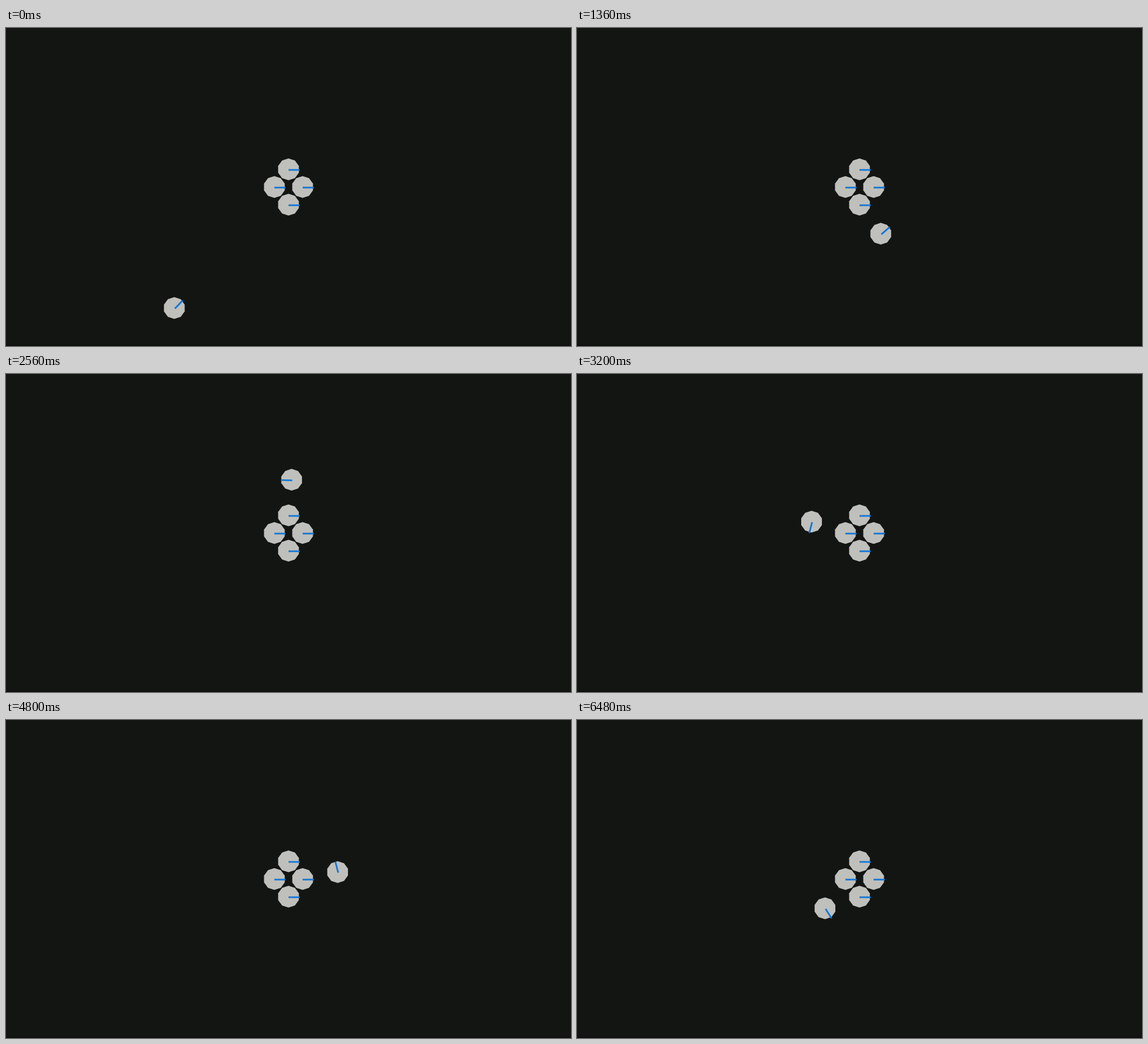
Animation of 960 by 540 pixels, one loop 6560 ms. Source, as an HTML page with a canvas:

```html
<!DOCTYPE html>
<html lang="en">
<head>
<meta charset="utf-8">
<title>Robot circling obstacles</title>
<style>
  html, body { margin: 0; height: 100%; overflow: hidden; background: #121512; }
  canvas { display: block; }
</style>
</head>
<body>
<canvas id="stage" width="960" height="540"></canvas>
<script>
const ctx = document.getElementById('stage').getContext('2d');
const STEP = 80, STEPS = 82, SUBSTEPS = 20;
const RADIUS = 18.5, SIDES = 10;

const center = { x: 480, y: 270 };
const obstacles = [[0, -30], [-24, 0], [24, 0], [0, 30]]
  .map(([dx, dy]) => ({ x: center.x + dx, y: center.y + dy }));

const FOLLOW_RANGE = 160; // start following the obstacles within this distance
const CLEARANCE = 60.5;   // distance kept while circling
const SOFTNESS = 22;      // how gently the robot closes in on that distance
const CRUISE = 15, APPROACH = 1.4; // pixels per step, and the extra when closing in

const distance = (a, b) => Math.hypot(a.x - b.x, a.y - b.y);
const bearing = (from, to) => Math.atan2(to.y - from.y, to.x - from.x);

// Head for the centre while far away, then circle the nearest obstacle counterclockwise.
function advance(robot) {
  const nearest = obstacles.reduce((a, b) => distance(robot, b) < distance(robot, a) ? b : a);
  const gap = distance(robot, nearest);
  let inward = Math.PI / 2, heading = bearing(robot, center);
  if (gap < FOLLOW_RANGE) {
    inward = Math.atan((gap - CLEARANCE) / SOFTNESS);
    heading = bearing(robot, nearest) + Math.PI / 2 - inward;
  }
  const length = (CRUISE + APPROACH * Math.sin(inward)) / SUBSTEPS;
  return { x: robot.x + length * Math.cos(heading), y: robot.y + length * Math.sin(heading) };
}

const path = [{ x: 286, y: 475.5 }];
while (path.length <= STEPS * SUBSTEPS) path.push(advance(path[path.length - 1]));

function drawRobot({ x, y }, heading, offset = 0) {
  ctx.fillStyle = '#bfc0bc';
  ctx.beginPath();
  for (let k = 0; k < SIDES; k++) {
    const a = k * 2 * Math.PI / SIDES;
    ctx.lineTo(x + RADIUS * Math.sin(a), y - RADIUS * Math.cos(a));
  }
  ctx.fill();
  ctx.strokeStyle = '#1376d6';
  ctx.lineWidth = 2.8;
  ctx.beginPath();
  ctx.moveTo(x + offset, y + 1);
  ctx.lineTo(x + offset + 19 * Math.cos(heading), y + 1 + 19 * Math.sin(heading));
  ctx.stroke();
}

function draw(now) {
  const i = Math.floor(now / STEP) % STEPS * SUBSTEPS;
  ctx.fillStyle = '#121512';
  ctx.fillRect(0, 0, 960, 540);
  ctx.fillStyle = '#0c0e0c';
  ctx.fillRect(0, 538, 960, 2);
  for (const obstacle of obstacles) drawRobot(obstacle, 0);
  drawRobot(path[i], bearing(path[i], path[i + SUBSTEPS / 2]), 1);
}

const start = performance.now();
function tick() {
  draw(performance.now() - start);
  requestAnimationFrame(tick);
}
tick();
</script>
</body>
</html>
```
